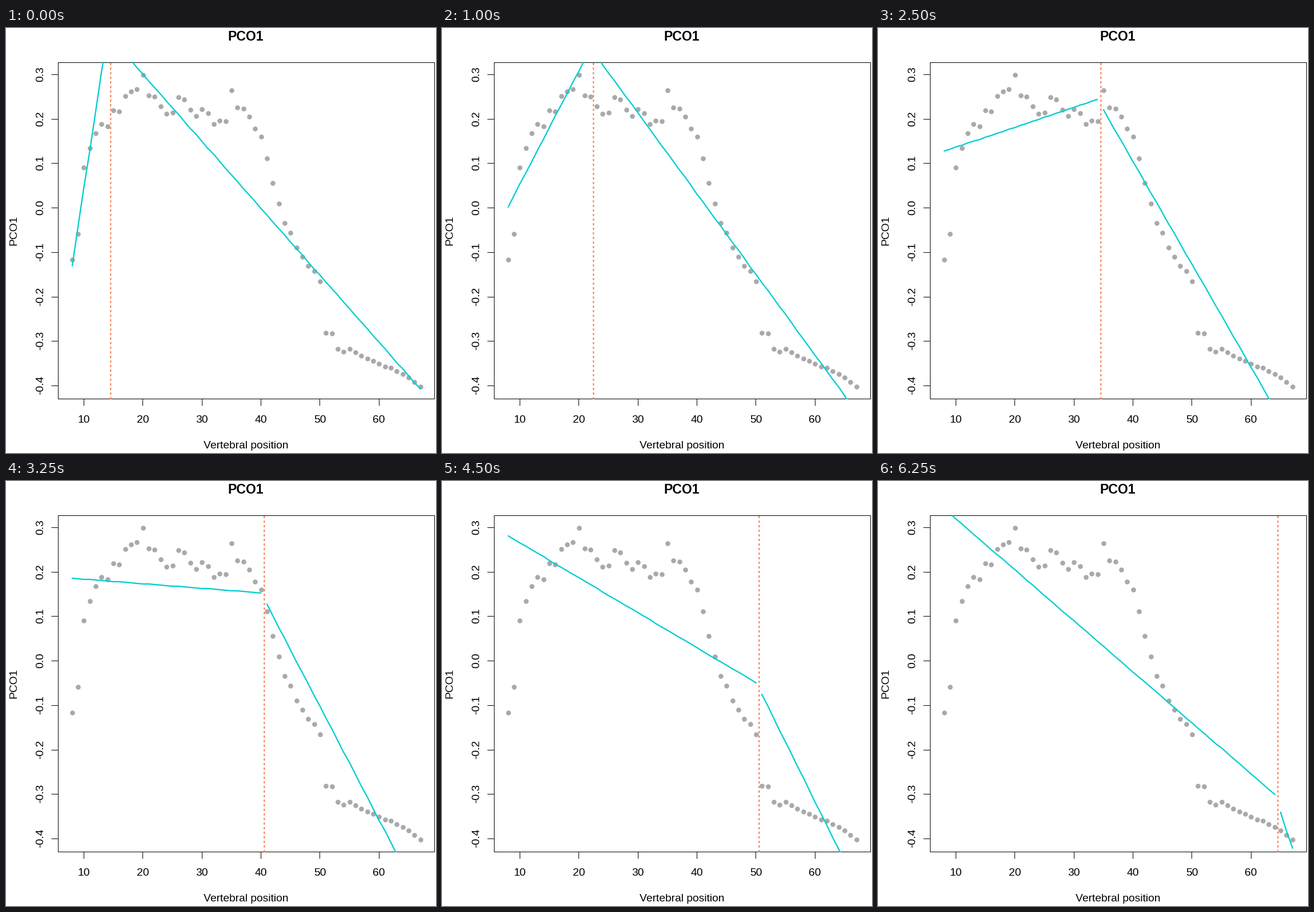
Write a matplotlib script that moves like this. It is 753x743 px and loops after 6500 ms.

```python
import numpy as np
import matplotlib.pyplot as plt
from matplotlib.animation import FuncAnimation
from matplotlib.patches import Rectangle

W, H, DPI = 753, 743, 64
PT = 72 / DPI  # points per pixel
LEFT, TOP, RIGHT, BOTTOM = 91.5, 59.5, 750.5, 647.5
FRAMES, INTERVAL = 26, 250

plt.rcParams.update({"font.family": "Liberation Sans", "lines.scale_dashes": False})

pos = np.arange(8, 68)
score = np.array([
    -.118, -.059, .0896, .134, .1668, .188, .182, .218, .2157, .251,
    .2613, .2665, .2987, .2517, .2491, .2273, .2105, .2137, .2478, .2427,
    .2195, .206, .2215, .2118, .188, .195, .1944, .2639, .2253, .2227,
    .204, .177, .1597, .1102, .0548, .0085, -.0346, -.0565, -.09, -.1105,
    -.1318, -.1427, -.1665, -.2823, -.283, -.3184, -.3242, -.3184, -.3261, -.3338,
    -.3396, -.3447, -.3512, -.3576, -.3608, -.3686, -.3743, -.3821, -.393, -.4026])


def px(x):
    return 91.1 + (np.asarray(x) - 5.64) * 10.341


def py(y):
    return 313.7 - 777.1 * np.asarray(y)


def hinge_fit(knot):
    """Least-squares fit of two lines joined at the knot."""
    basis = np.column_stack([np.ones(len(pos)), pos, np.maximum(pos - knot, 0)])
    coef = np.linalg.lstsq(basis, score, rcond=None)[0]
    return basis @ coef


fig = plt.figure(figsize=(W / DPI, H / DPI), dpi=DPI, facecolor="white")
ax = fig.add_axes([0, 0, 1, 1])
ax.set(xlim=(0, W), ylim=(H, 0))
ax.axis("off")


def rule(xs, ys):
    ax.plot(xs, ys, color="black", lw=PT, solid_capstyle="butt")


def label(x, y, text, size=19.2, **kw):
    ax.text(x, y, text, size=size * PT, ha=kw.pop("ha", "center"),
            va=kw.pop("va", "baseline"), **kw)


def side_label(x, y, text):
    label(x, y, text, rotation=90, ha="right", va="center")


ax.add_patch(Rectangle((LEFT, TOP), RIGHT - LEFT, BOTTOM - TOP,
                       fill=False, ec="black", lw=PT))
for v in range(10, 61, 10):
    x = np.floor(px(v)) + .5
    rule([x, x], [BOTTOM, BOTTOM + 12])
    label(px(v), 690, str(v))
for k in range(-4, 4):
    y = np.floor(py(k / 10)) + .5
    rule([LEFT - 12, LEFT], [y, y])
    ax.text(65, py(k / 10), f"{k / 10:.1f}", size=19.2 * PT, rotation=90,
            rotation_mode="anchor", ha="center", va="baseline")

label(420.3, 22, "PCO1", 23, weight="bold")
label(420.3, 735, "Vertebral position")
ax.text(18.5, 353.5, "PCO1", size=19.2 * PT, rotation=90,
        rotation_mode="anchor", ha="center", va="baseline")

ax.scatter(px(pos) + .2, py(score), s=(8.6 * PT) ** 2, c="darkgray", lw=0, zorder=3)

clip = Rectangle((LEFT, 59), RIGHT - LEFT, 590, transform=ax.transData)


def pen(color, z, **kw):
    line, = ax.plot([], [], color=color, lw=2.3 * PT, zorder=z, snap=False, **kw)
    line.set_clip_path(clip)
    return line


fits = [pen("darkturquoise", 4, solid_capstyle="round", solid_joinstyle="round")
        for _ in range(2)]
split = pen("coral", 5, ls=(0, (2 * PT, 6 * PT)), dash_capstyle="round")


def draw(i):
    knot = 14 + 2 * i
    fit = hinge_fit(knot)
    for line, part in zip(fits, (pos <= knot, pos > knot)):
        line.set_data(np.round(px(pos[part])), np.round(py(fit[part])))
    x = np.round(px(knot + .5)) + .3
    split.set_data([x, x], [648, 59])
    return *fits, split


anim = FuncAnimation(fig, draw, frames=FRAMES, interval=INTERVAL,
                     repeat=True, repeat_delay=0, blit=False)
plt.show()
```
